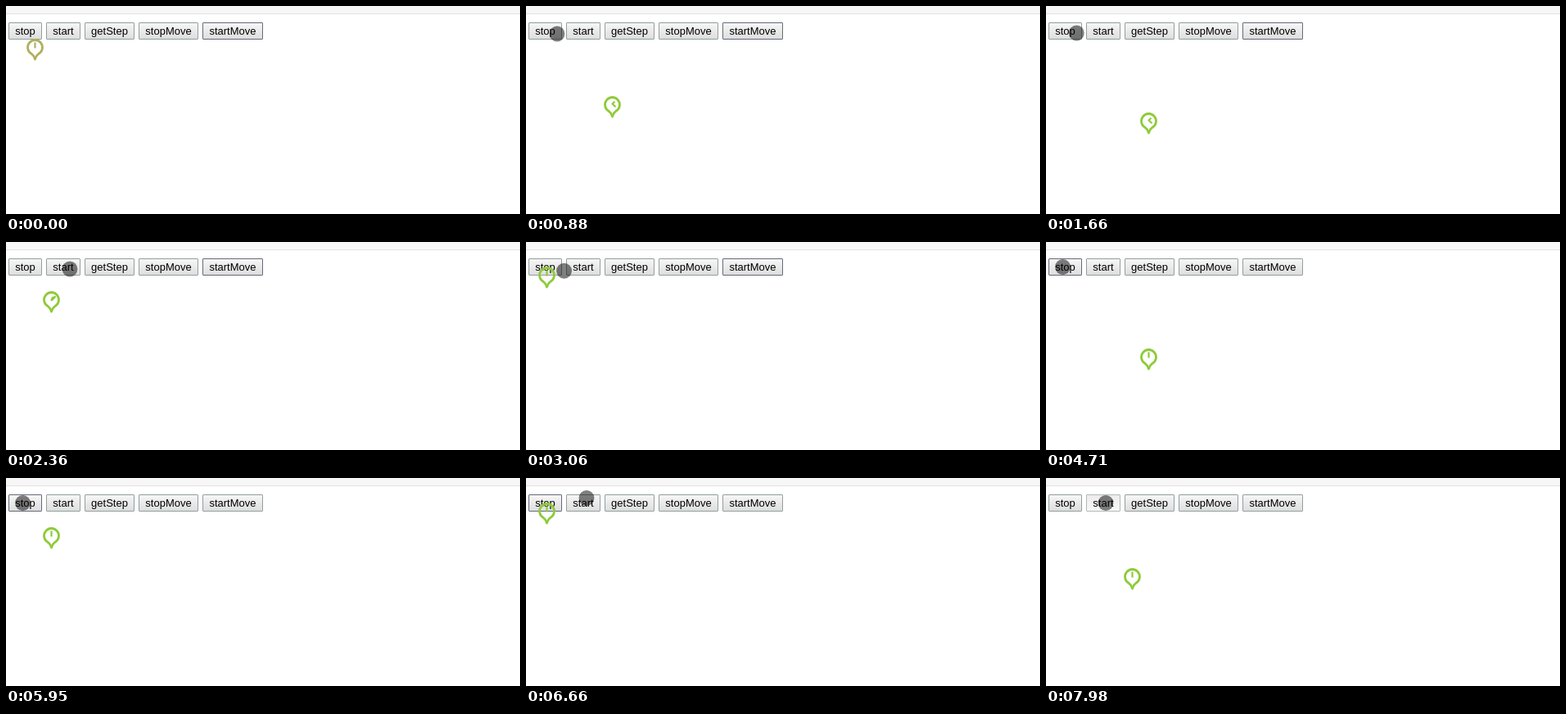
Animation, 628 px wide and 254 px high, one loop 8 s. Source, as an HTML page:

```html
<!DOCTYPE html>
<html lang="en">
<head>
<meta charset="utf-8">
<title>Marker controls</title>
<style>
  html, body { margin: 0; width: 100%; height: 100%; overflow: hidden; background: #fff; }
  .bar {
    position: absolute; left: 0; top: 0; width: 100%; height: 9px;
    background: #f7f7f7; border-bottom: 1px solid #e0e0e0;
  }
  .row { position: absolute; left: 3px; top: 20px; display: flex; gap: 5px; }
  button {
    height: 21px; padding: 0; box-sizing: border-box;
    border: 1px solid #949e9e; border-radius: 1px;
    background: linear-gradient(#f6f6f6, #dedede); color: #000;
    font: 13px/19px "Liberation Sans", Arial, sans-serif; text-align: center;
    pointer-events: none;
  }
  button.focus { border-color: #636a7a; }
  button.pressed { border-color: #b0b8b8; background: linear-gradient(#ececec, #f8f8f8); }
  svg { position: absolute; left: 0; top: 0; }
</style>
</head>
<body>
<div class="bar"></div>
<div class="row">
  <button id="stop" style="width:41px">stop</button>
  <button id="start" style="width:42px">start</button>
  <button style="width:61px">getStep</button>
  <button style="width:73px">stopMove</button>
  <button id="startMove" style="width:74px">startMove</button>
</div>
<svg width="628" height="254">
  <g id="pin" fill="none" stroke-width="2.8" stroke-linejoin="round">
    <path d="M10.5 25C9.6 22 8.5 20 6.2 18.4A9 9 0 1 1 14.8 18.4C12.5 20 11.4 22 10.5 25Z"/>
    <path id="hand" stroke-width="2.2"/>
  </g>
  <g id="cursor">
    <circle id="halo" r="15.3" fill="#faf828" fill-opacity=".7"/>
    <circle id="dot" r="9.4"/>
  </g>
</svg>
<script>
const LOOP = 8000, LAP = 3650, STEP = 310, TICK = 78, HAND_STEP = 325;
const STOP_CLICK = 3920, START_CLICK = 7820;
const $ = id => document.getElementById(id);
const [pin, hand, cursor, halo, dot] = ['pin', 'hand', 'cursor', 'halo', 'dot'].map($);

const stops = [15, 25, 45, 75, 95, 115];
const handShapes = ['M10.5 4.5V11.5', 'M10.5 11L11.8 8L15 7L12.2 10Z', 'M13.5 6.8L10.5 9.5L14.5 13.3'];

// [depart, arrive, x, y]
const moves = [
  [340, 730, 38, 34], [880, 1120, 27, 33], [1500, 2040, 78, 33],
  [2360, 2510, 73, 33], [2680, 3140, 38, 36], [3370, 3680, 36, 42],
  [3750, STOP_CLICK, 20.5, 30.5], [6200, 6490, 74, 24.5], [6980, 7130, 73, 30.5]
];

const within = (t, a, b) => t >= a && t < b;
const clamp = (v, lo, hi) => Math.min(hi, Math.max(lo, v));

// The marker climbs through the stops, rests, and comes back
function pinX(t) {
  const lap = (t + 640) % LAP;
  const count = from => clamp(Math.floor((lap - from) / STEP), 0, stops.length - 1);
  return stops[count(65) - count(2000)];
}

function cursorAt(t) {
  let x = 248, y = 172;
  for (const [a, b, nx, ny] of moves) {
    if (t < a) break;
    const p = t >= b ? 1 : Math.floor((t - a) / TICK) * TICK / (b - a);
    const u = p * p * (3 - 2 * p);
    x += (nx - x) * u;
    y += (ny - y) * u;
  }
  return [x, y];
}

function draw(t) {
  const x = pinX(t);
  pin.setAttribute('transform', `translate(${x} ${Math.min(x + 15, 130)})`);
  pin.setAttribute('stroke', t < 340 ? '#b0b060' : '#8ecb3a');
  const turn = Math.floor(Math.min(t, STOP_CLICK) / HAND_STEP);
  hand.setAttribute('d', handShapes[turn % 3]);

  const clicking = within(t, STOP_CLICK, 4170) || within(t, START_CLICK, 7980);
  cursor.style.display = t < 340 ? 'none' : '';
  cursor.setAttribute('transform', `translate(${cursorAt(t)})`);
  halo.style.display = clicking ? '' : 'none';
  dot.setAttribute('fill-opacity', clicking ? .32 : .5);

  $('startMove').classList.toggle('focus', t < 4170);
  $('stop').classList.toggle('pressed', within(t, 4170, 4330));
  $('stop').classList.toggle('focus', within(t, 4330, 7980));
  $('start').classList.toggle('pressed', t >= 7980);
}

function tick() {
  draw(performance.now() % LOOP);
  requestAnimationFrame(tick);
}
tick();
</script>
</body>
</html>
```
